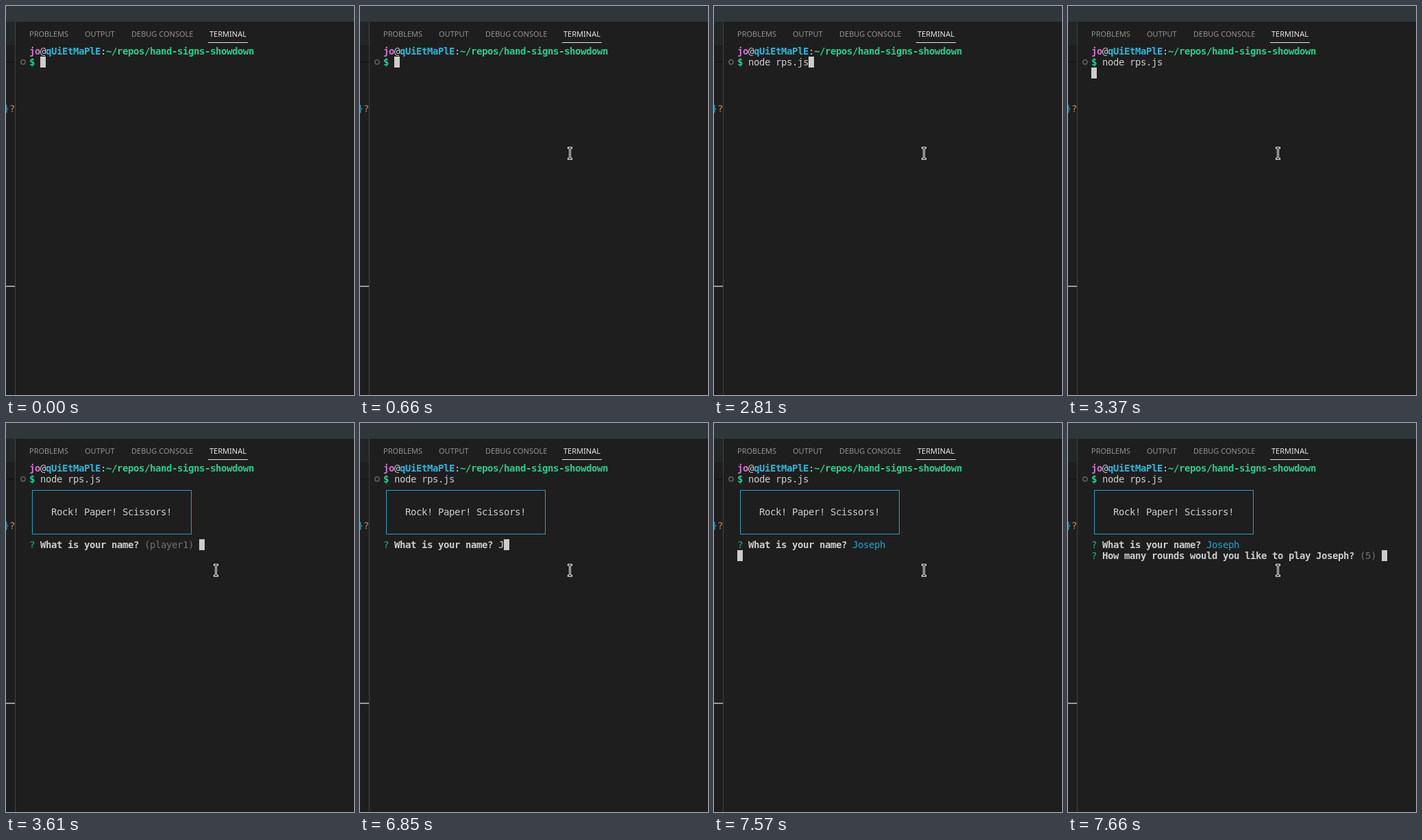
These frames come from a looping animation (508 px wide and 569 px high, 8 s). An HTML page with a canvas:

```html
<!DOCTYPE html>
<html lang="en">
<head>
<meta charset="utf-8">
<title>Terminal game</title>
<style>
  html, body { margin: 0; width: 100%; height: 100%; overflow: hidden; background: #1e1e1e; }
  canvas { display: block; }
</style>
</head>
<body>
<canvas id="stage" width="508" height="569"></canvas>
<script>
const ctx = document.getElementById('stage').getContext('2d');
const LOOP = 8000;
const MONO = '14px "DejaVu Sans Mono", monospace';
const UI = '11px "Noto Sans", sans-serif';
const C = {
  bg: '#1e1e1e', text: '#cccccc', magenta: '#d670d6', sky: '#29b8db',
  mint: '#23d18b', green: '#0dbc79', cyan: '#11a8cd', dim: '#727272'
};
const CELL_W = 8, CELL_H = 16, LEFT = 34, TOP = 58;
const PLAYER = 'Joseph';

function rect(x, y, w, h, color) {
  ctx.fillStyle = color;
  ctx.fillRect(x, y, w, h);
}

function label(str, x, y, font, color) {
  ctx.font = font;
  ctx.fillStyle = color;
  ctx.fillText(str, x, y);
}

// Terminal text sits on a fixed grid; returns the column after it.
function put(col, row, str, color = C.text, bold = false) {
  const font = (bold ? 'bold ' : '') + MONO;
  for (const ch of str) {
    label(ch, LEFT + col * CELL_W, TOP + row * CELL_H + 13, font, color);
    col++;
  }
  return col;
}

function block(col, row) {
  rect(LEFT + col * CELL_W, TOP + row * CELL_H, CELL_W, CELL_H, C.text);
}

function drawWindow() {
  rect(0, 0, 508, 569, C.bg);
  rect(0, 0, 508, 23, '#30373b');

  // Sliver of the editor on the left
  rect(0, 23, 13, 34, '#232626');
  rect(0, 81, 13, 2, '#151515');
  label('}', -3.4, 155, MONO, '#2f9fc4');
  label('?', 5, 155, MONO, '#c08a5c');
  rect(0, 409, 13, 2, '#9a9a9a');
  rect(13, 23, 1, 546, '#444444');
  rect(13, 57, 1, 88, '#513c30');

  const tabs = [['PROBLEMS', 34], ['OUTPUT', 115], ['DEBUG CONSOLE', 183], ['TERMINAL', 297]];
  tabs.forEach(([name, x], i) => label(name, x, 45, UI, i === 3 ? '#e7e7e7' : '#929292'));
  rect(295, 53, 58, 1, '#e7e7e7');

  ctx.strokeStyle = '#626262';
  ctx.lineWidth = 1.5;
  ctx.beginPath();
  ctx.arc(25, 82, 3.2, 0, Math.PI * 2);
  ctx.stroke();
}

function drawPrompt() {
  let col = put(0, 0, 'jo', C.magenta, true);
  col = put(col, 0, '@');
  col = put(col, 0, 'qUiEtMaPlE', C.sky, true);
  col = put(col, 0, ':');
  put(col, 0, '~/repos/hand-signs-showdown', C.mint, true);
  put(0, 1, '$', C.mint, true);
}

function drawBanner() {
  ctx.strokeStyle = '#1fa3c0';
  ctx.lineWidth = 1;
  ctx.strokeRect(38.5, 98.5, 232, 64);
  put(4, 4, 'Rock! Paper! Scissors!');
}

function ask(row, question) {
  put(0, row, '?', C.green);
  return put(2, row, question, C.text, true) + 1;
}

function typedCount(t) {
  const times = [6850, 7010, 7090, 7170, 7260];
  const counts = [1, 2, 3, 5, 6];
  return counts[times.filter(s => t >= s).length - 1] || 0;
}

function drawSession(t) {
  drawPrompt();
  const command = t < 1570 ? '' : t < 2810 ? 'clear' : 'node rps.js';
  const end = put(2, 1, command);
  if (t < 3370) return block(end, 1);
  if (t < 3610) return block(0, 2);

  drawBanner();
  const col = ask(7, 'What is your name?');
  const n = typedCount(t);
  if (!n) return block(put(col, 7, '(player1)', C.dim) + 1, 7);

  const done = t >= 7570;
  const next = put(col, 7, PLAYER.slice(0, n), done ? C.cyan : C.text);
  if (!done) return block(next, 7);
  if (t < 7660) return block(0, 8);
  const rounds = ask(8, `How many rounds would you like to play ${PLAYER}?`);
  block(put(rounds, 8, '(5)', C.dim) + 1, 8);
}

function beam(x, y, width, color) {
  ctx.strokeStyle = color;
  ctx.lineWidth = width;
  ctx.lineCap = 'square';
  ctx.beginPath();
  for (const dy of [-8, 8]) {
    ctx.moveTo(x - 2, y + dy);
    ctx.lineTo(x + 2, y + dy);
  }
  ctx.moveTo(x, y - 8);
  ctx.lineTo(x, y + 8);
  ctx.stroke();
}

// The pointer enters from the lower right in five eased steps.
function drawPointer(t) {
  if (t < 360) return;
  const step = Math.min(4, Math.floor((t - 360) / 75));
  const rest = (1 - step / 4) ** 2;
  const x = Math.round(307 + 78 * rest) - 0.5;
  const y = Math.round(216 + 105 * rest) - 0.5;
  beam(x, y, 3, '#f4f4f4');
  beam(x, y, 1, '#101010');
}

function frame(now) {
  const t = now % LOOP;
  drawWindow();
  drawSession(t);
  drawPointer(t);
  requestAnimationFrame(() => frame(performance.now() - start));
}

const start = performance.now();
frame(0);
</script>
</body>
</html>
```
